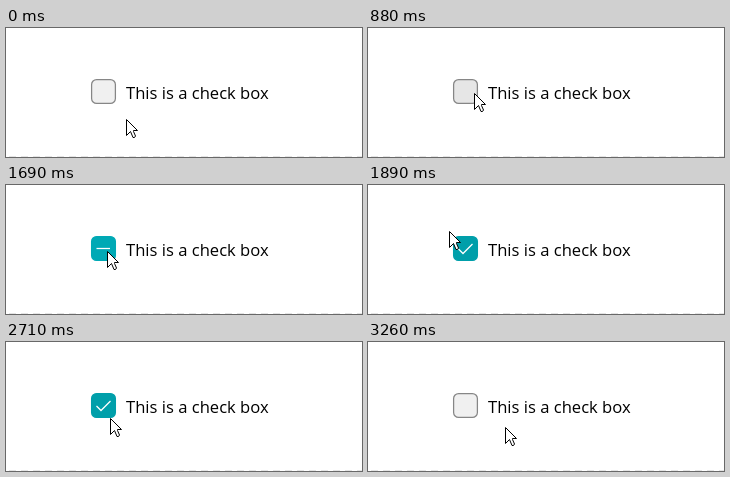
An HTML page for the animation above (3460 ms loop, 356 px wide and 129 px high).

```html
<!DOCTYPE html>
<html lang="en">
<head>
<meta charset="utf-8">
<title>Check box</title>
<style>
  :root {
    --rest: #f0f0f0;
    --hover: #e6e6e6;
    --edge: #868686;
    --teal: #009faa;
    --teal-hover: #00a9b5;
  }
  html, body { margin: 0; width: 100%; height: 100%; overflow: hidden; background: #fff; }
  svg { display: block; width: 356px; height: 129px; }
  text { font: 16.6px "Open Sans", "Noto Sans", sans-serif; fill: #000; }
  .rule { stroke: #e4e4e4; stroke-dasharray: 7 5; }
  .mark { fill: none; stroke: #fff; stroke-width: 1.25; }
  .box { stroke-width: 1.25; }
  .cursor { fill: #fff; stroke: #000; stroke-linejoin: round; }

  .box, .mark, .cursor { animation: 3460ms step-end infinite; }
  .box { animation-name: box; }
  .dash { animation-name: dash; }
  .tick { animation-name: tick; }
  .cursor { animation-name: move; }

  /* Each leg moves in equal jumps, about 70 ms apart */
  @keyframes move {
    0%          { translate: 120px 91px; }
    11.5%       { translate: 120px 91px; animation-timing-function: steps(4, start); }
    19.6%       { translate: 107px 72px; animation-timing-function: steps(4, start); }
    27.1%       { translate: 106px 65px; }
    34.9%       { translate: 106px 65px; animation-timing-function: steps(1, start); }
    36.9%       { translate: 112px 79px; animation-timing-function: steps(2, start); }
    40.4%       { translate: 119px 92px; }
    42.7%       { translate: 119px 92px; animation-timing-function: steps(4, start); }
    50.7%       { translate: 101px 66px; animation-timing-function: steps(3, start); }
    56.3%       { translate: 81px 46px; }
    60.3%       { translate: 81px 46px; animation-timing-function: steps(4, start); }
    68.3%       { translate: 130px 90px; }
    72.2%       { translate: 130px 90px; animation-timing-function: steps(4, start); }
    80.2%       { translate: 104px 76px; animation-timing-function: steps(3, start); }
    86.2%       { translate: 81px 47px; }
    90.1%       { translate: 81px 47px; animation-timing-function: steps(3, start); }
    96%, 100%   { translate: 137px 85px; }
  }

  @keyframes box {
    0%, 84.3%, 92.1%, 100% { fill: var(--rest); stroke: var(--edge); }
    17.6%, 90.1%           { fill: var(--hover); stroke: var(--edge); }
    29.1%, 46.7%, 60.3%, 80.2% { fill: var(--teal-hover); stroke: var(--teal-hover); }
    34.9%, 54.5%, 64.3%    { fill: var(--teal); stroke: var(--teal); }
  }
  @keyframes dash {
    0%, 54.5%, 100% { opacity: 0; }
    29.1%           { opacity: 1; }
  }
  @keyframes tick {
    0%, 84.3%, 100% { opacity: 0; }
    54.5%           { opacity: 1; }
  }
</style>
</head>
<body>
<svg viewBox="0 0 356 129">
  <path class="rule" d="M3 128.5H356"/>
  <rect class="box" x="85.6" y="51.6" width="23.8" height="23.8" rx="5"/>
  <path class="mark dash" d="M90.5 63.5H104"/>
  <path class="mark tick" d="M90.5 64L95 68.5L104.5 59"/>
  <text x="120" y="70.5">This is a check box</text>
  <path class="cursor" d="M.5 .5V16.5L4.5 12.5L7 18.5H8.5L9.5 17L7.5 12.5V11.5H11.5Z"/>
</svg>
</body>
</html>
```
